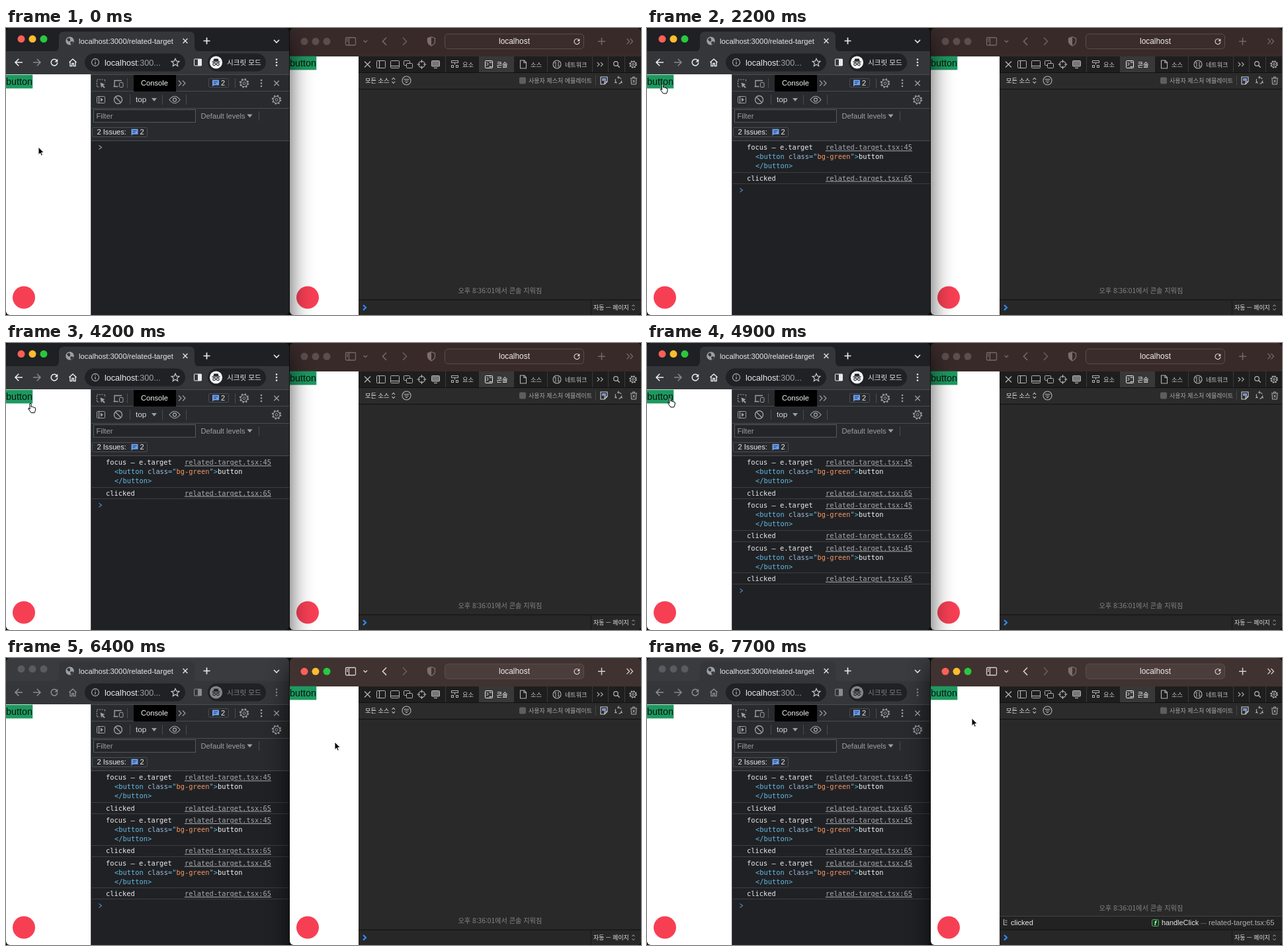
Animation of 960 by 434 pixels, one loop 8000 ms. Source, as an HTML page:

```html
<!DOCTYPE html>
<html lang="ko">
<head>
<meta charset="utf-8">
<title>Focus and click</title>
<style>
html, body { margin: 0; width: 100%; height: 100%; overflow: hidden; background: #0b0b0b; }
svg { display: block; width: 960px; height: 434px; }
text { font-family: "Liberation Sans", Arial, "Noto Sans CJK KR", "Noto Sans CJK", "Noto Sans KR", sans-serif; white-space: pre; }
.ko { font-family: "Noto Sans CJK KR", "Noto Sans CJK", "Noto Sans KR", sans-serif; }
.mono { font-family: "DejaVu Sans Mono", monospace; font-size: 10.37px; }
#stage { --strip: #1f2023; --chrome: 1; --bar: #392a2a; --field: #3b2c2c; --icon: #766868; }
#stage.right { --strip: #393b3f; --chrome: .48; --bar: #403230; --field: #4b3d3b; --icon: #d6cfcd; }
.dim { opacity: var(--chrome); }
.strip { fill: var(--strip); }
.bar { fill: var(--bar); }
.icon { stroke: var(--icon); fill: none; }
</style>
</head>
<body>
<svg id="stage" viewBox="0 0 960 434"></svg>
<script>
const stage = document.getElementById('stage');

const rect = (x, y, w, h, fill, more = '') =>
  `<rect x="${x}" y="${y}" width="${w}" height="${h}" fill="${fill}" ${more}/>`;
const frame = (x, y, w, h, color, r = 0, fill = 'none') =>
  rect(x + .5, y + .5, w - 1, h - 1, fill, `stroke="${color}" rx="${r}"`);
const disc = (x, y, r, fill, more = '') => `<circle cx="${x}" cy="${y}" r="${r}" fill="${fill}" ${more}/>`;
const ring = (x, y, r, color, w = 1.2) => disc(x, y, r, 'none', `stroke="${color}" stroke-width="${w}"`);
const line = (d, color, w = 1.2, more = '') =>
  `<path d="${d}" fill="none" stroke="${color}" stroke-width="${w}" ${more}/>`;
const shape = (d, fill, more = '') => `<path d="${d}" fill="${fill}" ${more}/>`;
const text = (x, y, size, fill, s, more = '') =>
  `<text x="${x}" y="${y}" font-size="${size}" fill="${fill}" ${more}>${s}</text>`;
const ko = (x, y, size, fill, s, weight = 400) =>
  text(x, y, size, fill, s, `class="ko" font-weight="${weight}"`);
const mono = (x, y, fill, s, more = '') => `<text class="mono" x="${x}" y="${y}" fill="${fill}" ${more}>${s}</text>`;
const cross = (x, y, r, color, w = 1.3) =>
  line(`M${x - r} ${y - r}l${2 * r} ${2 * r}m0 ${-2 * r}l${-2 * r} ${2 * r}`, color, w);
const plus = (x, y, r, color, w = 1.6) => line(`M${x - r} ${y}h${2 * r}M${x} ${y - r}v${2 * r}`, color, w);
const more = (x, y, color, r = 3.5) =>
  line(`M${x - r - 1} ${y - r}l${r} ${r}l${-r} ${r}m${r + 2} ${-2 * r}l${r} ${r}l${-r} ${r}`, color, 1.1);
const dots = (x, y, color) => [-4.5, 0, 4.5].map(d => disc(x, y + d, 1.3, color)).join('');
const gear = (x, y, r, color) => ring(x, y, r * .72, color, 1.1) + ring(x, y, r * .28, color, 1) +
  disc(x, y, r * .9, 'none', `stroke="${color}" stroke-width="1.8" stroke-dasharray="${r * .35} ${r * .357}"`);
const lights = (x, y, colors, id) =>
  `<g id="${id}">${colors.map((c, i) => disc(x + 17 * i, y, 5.5, c)).join('')}</g>`;
const reload = (x, y, r, color, w = 1.5) =>
  line(`M${x + r * .8} ${y - r * .6}A${r} ${r} 0 1 0 ${x + r} ${y + r * .1}`, color, w) +
  shape(`M${x + r * 1.1} ${y - r * 1.1}v${r}h${-r}z`, color);
const chat = (x, y) => shape(`M${x} ${y}h10v8h-7.5l-2.5 2z`, '#6ba0f5') +
  line(`M${x + 2} ${y + 2.7}h6m-6 2.5h4`, '#27344a', 1);
// Soft shade that the front window casts on the other one
const shadow = (id, x, clip) => `<g id="${id}" clip-path="url(#${clip})">` +
  rect(x, 14, 531, 500, '#000', 'opacity=".72" filter="url(#soft)"') + '</g>';

const G = '#9aa0a6', W = '#e8eaed', LINE = '#4a4c50';
const RGB = ['#ff5f57', '#febc2e', '#28c840'];

function page(x, y) {
  return rect(x, y, 40.3, 20.7, '#1e9960') + text(x, y + 15, 14.4, '#07150e', 'button');
}

function leftWindow() {
  const tab = 'M72 35.5q8 0 8-8V13.5q0-8 8-8h189q8 0 8 8v14q0 8 8 8z';
  const strip = rect(0, 0, 428, 70, '#35363a', 'class="strip"') + shape(tab, '#35363a') +
    lights(23, 16.6, RGB, 'lightsL') +
    disc(96.5, 19.5, 6.2, G) + shape('M92 17q4-4 5 0t-3 3zM97 21q4-2 5 1-1 3-4 3z', '#35363a') +
    text(110, 23.5, 11.28, '#e4e6e9', 'localhost:3000/related-target') +
    cross(271, 19.5, 3.4, '#dfe1e5', 1.4) + plus(303.5, 19.5, 5, W, 1.7) +
    line('M405 18l4 4 4-4', W, 1.6);
  const nav = rect(0, 35, 428, 35, '#35363a') +
    `<g class="dim">` +
    line('M25 52H14m5.2-5.2L14 52l5.2 5.2', W, 1.6) + reload(73, 52, 4.8, W, 1.6) +
    line('M95.5 52l5.5-5 5.5 5M97 51v6.5h2.8v-4h2.4v4h2.8V51', W, 1.4) + '</g>' +
    line('M41 52h11m-5.2-5.2L52 52l-5.2 5.2', '#85888d', 1.5) +
    rect(119, 38.5, 152, 27, '#202124', 'rx="13.5"') +
    ring(135, 52, 5.5, G, 1.3) + line('M135 51v4M135 48.4v1.4', G, 1.4) +
    text(149, 56.5, 12.6, W, `localhost<tspan fill="${G}">:300...</tspan>`) +
    shape('M256 46.2l1.7 3.9 4.2.4-3.2 2.8 1 4.2-3.7-2.2-3.7 2.2 1-4.2-3.2-2.8 4.2-.4z', 'none',
      `stroke="#c6c9cd" stroke-width="1.2"`) +
    rect(305, 38.5, 88, 27, '#202124', 'rx="13.5"') +
    `<g class="dim">` +
    frame(284, 46.5, 12, 11, W, 1) + rect(290, 47, 6, 10, W) +
    disc(317.5, 52, 9.6, '#f1f3f4') +
    shape('M314.5 46.5h6l1.2 3.6h-8.4zM311.5 50.6h12v1.1h-12z', '#202124') +
    ring(314.7, 54.8, 1.9, '#202124', 1.1) + ring(320.3, 54.8, 1.9, '#202124', 1.1) +
    line('M316.6 54.5h1.8', '#202124', 1) +
    ko(334, 56, 10.6, W, '시크릿 모드') + dots(409, 52, W) + '</g>';

  const tools = rect(128, 70, 300, 101, '#292a2d') +
    line('M128 70.5h300M128 95.5h300M128 121.5h300M128 170.5h300', LINE, 1) +
    line('M137.5 88.5v-10.5h11', G, 1.2, 'stroke-dasharray="2 1.5"') +
    line('M149.5 78v4M138 89h4', G, 1.2, 'stroke-dasharray="2 1.5"') +
    shape('M142.5 82.5l7 2.7-2.8 1.4 3 3-1.3 1.3-3-3-1.3 2.7z', G) +
    line('M164 88.5v-9h11M162.5 88.5h7', G, 1.4) + frame(171, 82, 6.5, 8, G, 1) +
    line('M183.5 76v15', LINE, 1) +
    rect(193, 71, 64, 25, '#000') + text(204, 87.3, 11.2, '#f1f3f4', 'Console') +
    more(266, 83.5, G, 4) +
    frame(306, 76, 31, 14, LINE, 1) + chat(312, 78.5) + text(325, 87, 11, W, '2') +
    line('M346.5 76v15', LINE, 1) + gear(360, 83.5, 7, G) + dots(386, 83.5, G) + cross(409, 83.5, 3.7, G) +
    frame(137, 103, 13, 11, G, 1) + line('M140.5 103v11', G) + shape('M143 105.5l4 3-4 3z', G) +
    ring(169.5, 108.5, 6, G, 1.4) + line('M165.3 104.3l8.4 8.4', G, 1.4) +
    line('M187.5 101v15M236.5 101v15M272.5 101v15', LINE, 1) +
    text(196, 112.3, 11.8, '#d5d8dc', 'top') + shape('M220 106h8l-4 5z', G) +
    line('M247 108.5q8-10.5 16 0q-8 10.5-16 0z', G) + ring(255, 108.5, 2.5, G, 1.3) +
    gear(409, 108.5, 7, G) +
    frame(132, 123, 155, 20, '#55585d', 0, '#242528') + text(136.5, 137.3, 11.2, G, 'Filter') +
    text(294.5, 137.3, 11.2, G, 'Default levels') + shape('M364.5 130.5h8l-4 5z', G) +
    line('M382.5 126v14', LINE, 1) +
    frame(130, 150, 84, 15, LINE, 1) + text(137.5, 161.3, 11.1, W, '2 Issues:') +
    chat(189.5, 152.7) + text(202.5, 161.3, 11.1, W, '2');

  return '<g clip-path="url(#clipL)">' + strip + nav +
    rect(0, 70, 128, 364, '#fff') + page(0, 70.7) + disc(27, 407.5, 17, '#f73f54') +
    rect(128, 171, 300, 263, '#202124') + tools + rect(128, 71, 1, 363, '#4a4c50') +
    [0, 1, 2].map(logEntry).join('') +
    line('M140.5 177.5l4 3-4 3', '#9aa0a6', 1.2, 'id="prompt"') + '</g>';
}

// One focus message and one click message, each shown on its own.
function logEntry(i) {
  const y = 184.3 + 64.7 * i;
  const link = (dy, n) => mono(270, y + dy, '#a3a8ae', `related-target.tsx:${n}`, 'text-decoration="underline"');
  const rule = dy => rect(128, Math.round(y + dy), 300, 1, '#3c3e42');
  const tag = '#62b9e2';
  return `<g class="log">${mono(151, y, '#e8eaed', 'focus – e.target')}${link(0, 45)}` +
    mono(164, y + 14, tag, `&lt;button <tspan fill="#9bbbdc">class</tspan>="<tspan fill="#f29766">bg-green</tspan>"&gt;` +
      `<tspan fill="#f1f3f4">button</tspan>`) +
    mono(164, y + 28, tag, '&lt;/button&gt;') + rule(33.5) + '</g>' +
    `<g class="log">${mono(151, y + 46.3, '#e8eaed', 'clicked')}${link(46.3, 65)}${rule(50.5)}</g>`;
}

function rightWindow() {
  const C = '#b4b4b4', D = '#111', TABS = '#1e1e1e';
  const icon = (d, w = 1.3) => `<path class="icon" d="${d}" stroke-width="${w}"/>`;
  const bar = rect(429, 0, 531, 43, '#392a2a', 'class="bar"') + lights(451, 20.3, RGB, 'lightsR') +
    icon('M515 14.5h12q1.5 0 1.5 1.5v8.5q0 1.5-1.5 1.5h-12q-1.5 0-1.5-1.5V16q0-1.5 1.5-1.5zM518.5 14.5v11.5M515 17.5h2M515 20h2') +
    icon('M540.5 18.8l2.8 2.8 2.8-2.8', 1.4) + icon('M575 14.5l-5.5 5.7 5.5 5.7', 1.6) +
    line('M600 14.5l5.5 5.7-5.5 5.7', '#6b5c5b', 1.6) +
    line('M643 13.5l5.5 2v5q-.5 4-5.5 6.5-5-2.5-5.5-6.5v-5z', '#7d6e6c', 1.3) +
    shape('M643 14v13q-5-2.5-5.5-6.5v-5z', '#7d6e6c') +
    `<rect x="663.5" y="9" width="210" height="22.5" rx="5" stroke="#5d4e4d" style="fill:var(--field)"/>` +
    text(745, 24.3, 11.9, '#f0eceb', 'localhost') + reload(863, 20.5, 4, '#d8d1d0', 1.2) +
    icon('M895 20.2h11M900.5 14.7v11', 1.5) + icon('M938.5 16l4 4.2-4 4.2m5-8.4l4 4.2-4 4.2', 1.3);

  const sep = [664, 715, 767, 818, 886, 910, 935].map(x => rect(x, 43, 1, 24, '#3a3a3a')).join('');
  const tabs = rect(533, 43, 427, 24, TABS) + rect(716, 43, 51, 24, '#383838') + sep +
    cross(546.5, 55, 4.5, C) +
    frame(560, 49, 14, 12, C, 1) + line('M564.5 49v12', C) +
    frame(581, 49, 14, 12, C, 1) + line('M581 57.5h14', C) +
    frame(601, 49, 10, 8, C, 1) + frame(605, 53, 10, 8, C, 1, TABS) +
    ring(628.5, 55, 4.7, C) + line('M628.5 48v4.5M628.5 57.5v4.5M621.5 55h4.5M631 55h4.5', C) +
    frame(643, 49, 13, 9.5, C, 1, '#777') + line('M647 60.5h5', C) +
    frame(673, 49, 11, 4, C) + frame(673, 56, 4, 4, C) + frame(680, 56, 4, 4, C) + line('M678.5 53v2.5', C, 1) +
    ko(690, 58.7, 9.3, '#c4c4c4', '요소') +
    frame(724, 49, 12, 12, '#ececec', 1) + line('M726.5 52l2.5 2.5-2.5 2.5m4 1.5h4M730.5 52h4', '#ececec', 1) +
    ko(741.5, 58.7, 9.3, '#fff', '콘솔', 500) +
    line('M777.5 49h6l3 3v9h-9zM783 49v3.5h3.5', C, 1.1) + ko(793, 58.7, 9.3, '#c4c4c4', '소스') +
    ring(833, 55, 6, C, 1.1) + line('M831 59v-7.5l-2 2M835 51v7.5l2-2', C, 1) +
    ko(845, 58.7, 9.1, '#c4c4c4', '네트워크') + more(898, 55, C, 3.2) +
    ring(922, 54, 3.3, C) + line('M924.5 56.5l3.2 3.2', C, 1.4) + gear(948, 55, 5.5, C);

  const filters = rect(533, 67, 427, 25, '#2b2b2b') + rect(533, 67, 427, 1, D) + rect(533, 92, 427, 1, D) +
    ko(543, 82.5, 9.2, '#e6e6e6', '모든 소스', 500) +
    line('M583.5 78l2.3-2.5 2.3 2.5m-4.6 3l2.3 2.5 2.3-2.5', '#ccc', 1.1) +
    ring(605.5, 79.5, 6.5, C, 1.1) + line('M601.5 77.5h8M602.5 80h6M604 82.5h3', C, 1) +
    rect(776, 74.5, 10, 10, '#5e5e5e', 'rx="2"') + ko(790, 82.5, 9, '#aaa', '사용자 제스처 에뮬레이트') +
    rect(891, 72, 1, 15, '#444') +
    line('M899 74h10v7l-4 4h-6zM909 81h-4v4', '#d4d4d4', 1.1) + rect(901, 76, 6, 4, '#7a8fd8') +
    disc(926, 79.5, 4.8, 'none', `stroke="${C}" stroke-width="1.1" stroke-dasharray="7 3"`) +
    line('M926 72.5v4M920 83l3-1.5M932 83l-3-1.5', C, 1.1) +
    line('M944 76h10M947.5 75.5v-1.5h3v1.5M945 76.5l.5 8.5h7l.5-8.5M947.5 78.5l3 4m0-4l-3 4', C, 1);

  const prompt = rect(533, 411, 427, 23, '#272727') + rect(533, 410.5, 427, 1, D) +
    line('M540 419l4 3.8-4 3.8', '#2b8cff', 2.2) + rect(884, 411, 1, 23, '#171717') +
    ko(888, 426.2, 8.9, '#e2e2e2', '자동 — 페이지', 500) +
    line('M946.5 421l2-2.3 2 2.3m-4 3.5l2 2.3 2-2.3', '#aaa', 1);

  const clicked = '<g id="clicked">' + rect(533, 390, 427, 1, '#424242') + rect(533, 391, 427, 20, '#222') +
    line('M539.5 395v9M539.5 403.5h5M541.5 397h3M541.5 400h3', '#b5b5b5', 1.2) +
    text(550, 404.3, 11.1, '#efefef', 'clicked') +
    frame(763, 395, 11, 11, '#49b35c', 2, '#163d1d') +
    text(767, 404, 9, '#e9ffe9', 'f', 'font-style="italic" font-weight="700"') +
    text(778, 404.3, 10.85, '#e6e6e6', 'handleClick') + text(837, 404.3, 9, '#777', '—') +
    text(849, 404.3, 11.2, '#b0b0b0', 'related-target.tsx:65') + '</g>';

  return '<g clip-path="url(#clipR)">' + bar + rect(429, 43, 104, 391, '#fff') + page(429, 42.7) +
    disc(456, 407.5, 17, '#f73f54') +
    rect(533, 92, 427, 342, '#292929') +
    tabs + filters + `<g id="cleared">${ko(683.5, 400.8, 10.2, '#858585', '오후 8:36:01에서 콘솔 지워짐')}</g>` +
    clicked + prompt + '</g>';
}

const cursors =
  shape('M0 0V11.7L2.7 9.2 4.4 13.2 6.4 12.3 4.7 8.5H8.3z', '#000',
    'id="arrow" stroke="#fff" stroke-width="1" stroke-linejoin="round"') +
  '<g id="hand">' + shape('M2 1Q3.3-.6 4.4 1V5.5Q6.2 4.5 6.7 6 8.4 5.2 8.8 6.7 11 6.2 10.9 8.5L10.5 11.5 9.3 14.5H4.3L1 10Q-.8 7.5.6 7.2L2.4 9z',
    '#fff', 'transform="translate(-3 -.5)" stroke="#000" stroke-width="1" stroke-linejoin="round"') + '</g>';

stage.innerHTML = '<defs>' +
  '<filter id="soft" x="-20%" y="-20%" width="140%" height="140%"><feGaussianBlur stdDeviation="18"/></filter>' +
  '<clipPath id="clipL"><rect width="428" height="434" rx="6"/></clipPath>' +
  '<clipPath id="clipR"><rect x="429" width="531" height="434" rx="6"/></clipPath></defs>' +
  leftWindow() + rightWindow() +
  shadow('shadeR', -103, 'clipR') + shadow('shadeL', 429, 'clipL') + cursors;

const $ = id => document.getElementById(id);
const logs = [...stage.querySelectorAll('.log')];
const show = (el, on) => { el.style.display = on ? '' : 'none'; };

// Pointer tip: time, x, y
const path = [
  [0, 49, 180], [100, 49, 180], [600, 23, 85], [2100, 23, 85], [2600, 25, 85], [3100, 25, 85],
  [3400, 31.5, 81.5], [3900, 31.5, 81.5], [4100, 39, 100], [4300, 34.5, 83], [5600, 34.5, 83],
  [6000, 497, 127], [6400, 497, 127], [6700, 449, 54.5], [7300, 449, 54.5], [7700, 491, 91]
];
const logTimes = [800, 900, 4500, 4600, 4800, 4900];
const switchTime = 6300, clickTime = 6900;

const ease = p => p * p * (3 - 2 * p);
function pointer(t) {
  const i = path.findIndex(k => k[0] > t);
  if (i < 0) return path[path.length - 1].slice(1);
  const [t0, x0, y0] = path[i - 1], [t1, x1, y1] = path[i];
  const p = ease((t - t0) / (t1 - t0));
  return [x0 + (x1 - x0) * p, y0 + (y1 - y0) * p];
}

function paintLights(id, on, off) {
  [...$(id).children].forEach((c, i) => c.setAttribute('fill', on ? RGB[i] : off));
}

function draw(now) {
  const t = Math.floor(now % 8000 / 100) * 100;
  const right = t >= switchTime, done = t >= clickTime;
  stage.classList.toggle('right', right);
  show($('shadeR'), !right);
  show($('shadeL'), right);
  paintLights('lightsL', !right, '#595b5f');
  paintLights('lightsR', right, '#5d4e4e');

  const count = logTimes.filter(k => k <= t).length;
  logs.forEach((el, i) => show(el, i < count));
  const drop = Math.floor(count / 2) * 64.7 + count % 2 * 48;
  $('prompt').setAttribute('transform', `translate(0 ${drop})`);
  $('prompt').setAttribute('stroke', count ? '#4f83bd' : '#8b9096');

  show($('clicked'), done);
  $('cleared').setAttribute('transform', `translate(0 ${done ? -18.5 : 0})`);

  const [x, y] = pointer(t);
  const over = (x < 40 && y > 71 && y < 92) || (x >= 429 && x < 469 && y > 43 && y < 64);
  for (const id of ['arrow', 'hand']) {
    show($(id), (id === 'hand') === over);
    $(id).setAttribute('transform', `translate(${x} ${y})`);
  }
}

function tick(now) {
  draw(now);
  requestAnimationFrame(tick);
}
draw(0);
requestAnimationFrame(tick);
</script>
</body>
</html>
```
